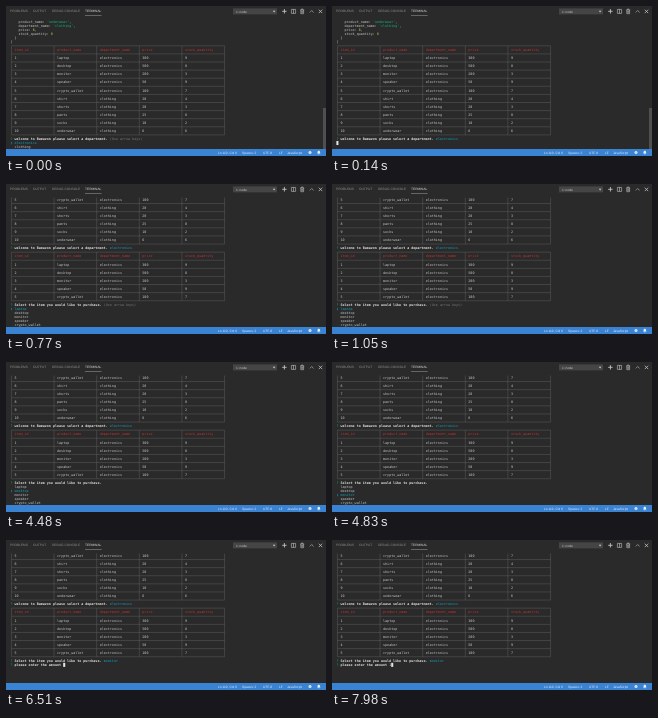
An HTML page for the animation above (8000 ms loop, 320 by 150 pixels).

```html
<!DOCTYPE html>
<html lang="en">
<head>
<meta charset="utf-8">
<title>Terminal session</title>
<style>
  html, body { margin: 0; width: 100%; height: 100%; overflow: hidden; background: #2a2a2a; }
  svg { display: block; width: 100vw; height: 100vh; }
  text { white-space: pre; text-rendering: geometricPrecision; }
  .term text { font: 3.37px "DejaVu Sans Mono", "Liberation Mono", monospace; }
  .ui text { font: 3.24px "Liberation Sans", Arial, sans-serif; }
  .icon { fill: none; stroke: #c5c5c5; stroke-width: .6; }
</style>
</head>
<body>
<svg id="stage" viewBox="0 0 320 150" preserveAspectRatio="none">
  <rect width="320" height="150" fill="#2a2a2a"/>
  <g class="ui" fill="#8f8f8f">
    <text x="4" y="6.3">PROBLEMS</text>
    <text x="27" y="6.3">OUTPUT</text>
    <text x="46" y="6.3">DEBUG CONSOLE</text>
    <text x="79" y="6.3" fill="#e0e0e0">TERMINAL</text>
    <rect x="79" y="9" width="16.6" height=".5" fill="#a0a0a0"/>
    <rect x="227" y="2.4" width="44" height="6" fill="#454545"/>
    <text x="230" y="6.6" fill="#d0d0d0">1: node</text>
    <path d="M266.8 4.8h2.6l-1.3 1.6z" fill="#d0d0d0"/>
  </g>
  <g class="icon">
    <path d="M276.2 5.3h4.4M278.4 3.1v4.4" stroke-width=".9"/>
    <path d="M285.4 3.4h4.2v4h-4.2zM287.5 3.4v4"/>
    <path d="M294.2 3.9h4M295.5 3.7v-.7h1.4v.7M294.8 4v3.7h2.8v-3.7M295.8 4.8v2M296.7 4.8v2"/>
    <path d="M303.8 6.4l1.9-1.9 1.9 1.9"/>
    <path d="M312.8 3.7l3.4 3.4M316.2 3.7l-3.4 3.4" stroke-width=".8"/>
  </g>
  <g class="term" id="term"></g>
  <g class="ui" fill="#e8f1fb">
    <rect y="143" width="320" height="7" fill="#3a82d2"/>
    <text x="212" y="147.7">Ln 110, Col 6</text>
    <text x="236" y="147.7">Spaces: 2</text>
    <text x="257" y="147.7">UTF-8</text>
    <text x="273" y="147.7">LF</text>
    <text x="281" y="147.7">JavaScript</text>
    <circle cx="304" cy="146.4" r="1.5"/>
    <path d="M303.2 146.7q.8 .9 1.6 0" fill="none" stroke="#3a82d2" stroke-width=".4"/>
    <path d="M311 147.5q.6-.5 .6-1.6t1.2-1.2 1.2 1.2 .6 1.6zM312.2 147.8h1.2v.5h-1.2z"/>
  </g>
</svg>
<script>
const LOOP = 8000, X0 = 4.4, CW = 2.03, Y0 = 15.5, LH = 4.05;
const C = { fg: '#cccccc', white: '#e5e5e5', cyan: '#11a8cd', green: '#0dbc79',
            yellow: '#d0d05a', red: '#cd3131', dim: '#7a7a7a', line: '#6a6a6a' };
const term = document.getElementById('term');

function add(parent, tag, attrs, content) {
  const el = document.createElementNS('http://www.w3.org/2000/svg', tag);
  for (const k in attrs) el.setAttribute(k, attrs[k]);
  if (content !== undefined) el.textContent = content;
  parent.appendChild(el);
  return el;
}

const colX = c => X0 + c * CW;
const rowY = r => Y0 + r * LH;

function put(g, col, row, str, color = C.fg, weight = 400) {
  add(g, 'text', { x: colX(col), y: rowY(row) + 1.2, fill: color,
                   style: `font-weight:${weight}` }, str);
}

// A group that is visible only from start to end, in ms
function layer(start, end) {
  const g = add(term, 'g', {});
  const key = (t, opacity) => ({ offset: t / LOOP, opacity, easing: 'steps(1, end)' });
  const keys = [key(start, 1), key(end, 0)];
  if (start > 0) keys.unshift(key(0, 0));
  if (end < LOOP) keys.push(key(LOOP, 0));
  else keys[keys.length - 1].opacity = 1;
  g.animate(keys, { duration: LOOP, iterations: Infinity });
  return g;
}

const HEAD = ['item_id', 'product_name', 'department_name', 'price', 'stock_quantity'];
const ITEMS = [
  ['laptop', 300, 9], ['desktop', 500, 8], ['monitor', 200, 3], ['speaker', 50, 9],
  ['crypto_wallet', 100, 7], ['shirt', 20, 4], ['shorts', 20, 3], ['pants', 25, 8],
  ['socks', 10, 2], ['underwear', 6, 6]
].map(([name, price, stock], i) =>
  [i + 1, name, i < 5 ? 'electronics' : 'clothing', price, stock]);

// Rows are separated by one ruled line; open tables continue above the view
function table(g, top, rows, open = false) {
  const first = open ? top : top + 1;
  const last = first + (rows.length - 1) * 2 + 1;
  const y1 = open ? rowY(top) - LH / 2 : rowY(top), y2 = rowY(last);
  const left = colX(.5), right = colX(105.5);
  let d = '';
  for (let c = 0; c <= 5; c++) d += `M${colX(c * 21 + .5)} ${y1}V${y2}`;
  for (let r = open ? top + 1 : top; r <= last; r += 2) d += `M${left} ${rowY(r)}H${right}`;
  add(g, 'path', { d, fill: 'none', stroke: C.line, 'stroke-width': .4 });
  rows.forEach((cells, i) => cells.forEach((cell, c) =>
    put(g, c * 21 + 2, first + i * 2, cell, cells === HEAD ? C.red : C.fg)));
}

// One "name: value" line of the logged object
function field(g, row, name, value, color, tail = '') {
  const col = 4 + name.length + 2;
  put(g, 4, row, name + ':');
  put(g, col, row, value, color);
  put(g, col + value.length, row, tail);
}

function ask(g, row, str) {
  put(g, 0, row, '?', C.green);
  put(g, 2, row, str, C.white, 700);
}

function menu(g, row, names, pick) {
  names.forEach((name, i) => put(g, 2, row + i, name, i === pick ? C.cyan : C.fg));
  put(g, 0, row + pick, '❯', C.cyan);
}

function cursor(g, col, row) {
  add(g, 'rect', { x: colX(col), y: rowY(row) - LH / 2, width: CW, height: LH, fill: C.white });
}

const DEPT = 'welcome to Bamazon please select a department.';
const ITEM = 'Select the item you would like to purchase.';
const AMOUNT = 'please enter the amount';
const HINT = '(Use arrow keys)';
const after = str => str.length + 3;

// Department screen
const dept = layer(0, 770);
field(dept, 0, 'product_name', "'underwear'", C.green, ',');
field(dept, 1, 'department_name', "'clothing'", C.green, ',');
field(dept, 2, 'price', '6', C.yellow, ',');
field(dept, 3, 'stock_quantity', '6', C.yellow);
put(dept, 2, 4, '}');
put(dept, 0, 5, ']');
table(dept, 6, [HEAD, ...ITEMS]);
ask(dept, 29, DEPT);
add(dept, 'rect', { x: 317, y: 102, width: 3, height: 41, fill: '#4f4f4f' });

const choose = layer(0, 140);
put(choose, after(DEPT), 29, HINT, C.dim);
menu(choose, 30, ['electronics', 'clothing'], 0);

const chosen = layer(140, 770);
put(chosen, after(DEPT), 29, 'electronics', C.cyan);
cursor(chosen, 0, 30);

// Item screen
const shop = layer(770, LOOP);
table(shop, 0, ITEMS.slice(4), true);
ask(shop, 12, DEPT);
put(shop, after(DEPT), 12, 'electronics', C.cyan);
table(shop, 13, [HEAD, ...ITEMS.slice(0, 5)]);
ask(shop, 26, ITEM);

const names = ITEMS.slice(0, 5).map(item => item[1]);
[[770, 4480], [4480, 4830], [4830, 6510]].forEach(([start, end], pick) => {
  const g = layer(start, end);
  if (pick === 0) put(g, after(ITEM), 26, HINT, C.dim);
  menu(g, 27, names, pick);
});

// Amount prompt
const amount = layer(6510, LOOP);
put(amount, after(ITEM), 26, 'monitor', C.cyan);
ask(amount, 27, AMOUNT);
cursor(layer(6510, 7630), after(AMOUNT), 27);
const typed = layer(7630, LOOP);
put(typed, after(AMOUNT), 27, '1', C.fg);
cursor(typed, after(AMOUNT) + 1, 27);
</script>
</body>
</html>
```
